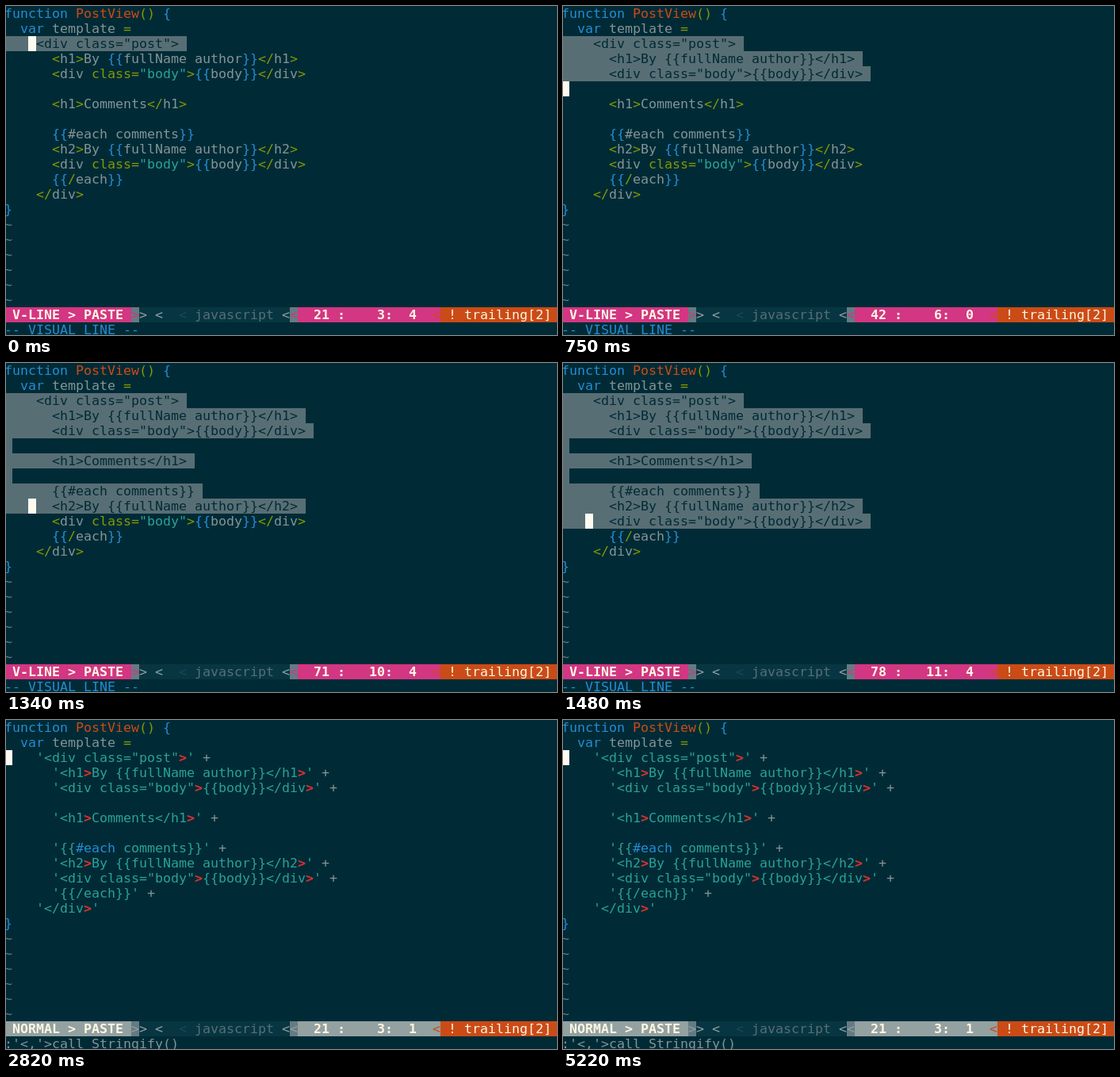
Write an HTML page that moves like this. It is 695 by 415 pixels and loops after 5610 ms.

```html
<!DOCTYPE html>
<html lang="en">
<head>
<meta charset="utf-8">
<title>Wrapping lines as strings</title>
<style>
  html, body { margin: 0; width: 100%; height: 100%; overflow: hidden; background: #002b36; }
  svg { display: block; width: 695px; height: 415px; }
  text { font: 16.61px "DejaVu Sans Mono", "Liberation Mono", monospace; white-space: pre; }
</style>
</head>
<body>
<svg id="screen" viewBox="0 0 695 415"></svg>
<script>
const C = {
  bg: '#002b36', bar: '#073642', faint: '#1b4a55', dim: '#586e75', mid: '#657b83',
  text: '#839496', pale: '#93a1a1', cream: '#fdf6e3', cursor: '#fefaf0',
  blue: '#268bd2', green: '#859900', cyan: '#2aa198', orange: '#cb4b16',
  red: '#dc322f', pink: '#d33682'
};
const LOOP = 5610, DONE = 2820, FIRST = 2, LAST = 12;
const STEPS = [450, 600, 750, 890, 1040, 1190, 1340, 1480, 1630, 1930];
const CELL = 10, ROW = 19, LEFT = -2, BASE = 15;

const LINES = [
  'function PostView() {',
  '  var template =',
  '    <div class="post">',
  '      <h1>By {{fullName author}}</h1>',
  '      <div class="body">{{body}}</div>',
  '',
  '      <h1>Comments</h1>',
  '',
  '      {{#each comments}}',
  '      <h2>By {{fullName author}}</h2>',
  '      <div class="body">{{body}}</div>',
  '      {{/each}}',
  '    </div>',
  '}'
];

const CODE_RULES = [
  [/^"[^"]*"/, C.cyan],
  [/^(function|var)\b/, C.blue],
  [/^PostView/, C.orange],
  [/^class=/, C.green],
  [/^[<>=\/()]+/, C.green],
  [/^[{}]+/, C.blue],
  [/^(\w+|.)/, C.text]
];
const STRING_RULES = [
  [/^ \+$/, C.text],
  [/^>/, C.red, true],
  [/^#each/, C.blue],
  [/^(\w+|[^\w>#])/, C.cyan]
];

const screen = document.getElementById('screen');
const escapeText = s => s.replace(/&/g, '&amp;').replace(/</g, '&lt;').replace(/>/g, '&gt;');

function write(row, col, str, color, bold) {
  if (!str.trim()) return '';
  return `<text x="${col * CELL + LEFT}" y="${row * ROW + BASE}" fill="${color}"` +
    `${bold ? ' font-weight="700" style="font-weight:700"' : ''}>${escapeText(str)}</text>`;
}

function fill(row, from, to, color) {
  const x = Math.max(0, from * CELL + LEFT);
  return `<rect x="${x}" y="${row * ROW}" width="${to * CELL + LEFT - x}" height="${ROW}" fill="${color}"/>`;
}

function highlight(row, line, rules) {
  let out = '', col = 0;
  while (col < line.length) {
    const rest = line.slice(col);
    const [pattern, color, bold] = rules.find(rule => rule[0].test(rest));
    const token = rest.match(pattern)[0];
    out += write(row, col, token, color, bold);
    col += token.length;
  }
  return out;
}

function quote(line, row) {
  if (!line) return '';
  return line.replace(/\S.*/, "'$&'") + (row < LAST ? ' +' : '');
}

function statusBar(mode, color, lineNo, colNo) {
  const r = 20;
  const percent = String(Math.floor(lineNo * 100 / LINES.length)).padStart(3);
  return fill(r, 0, 70, C.bar) +
    fill(r, 0, 16, color) + fill(r, 16, 17, C.mid) +
    fill(r, 36, 37, C.mid) + fill(r, 37, 55, color) + fill(r, 55, 70, C.orange) +
    write(r, 1, mode + ' > PASTE', C.cream, true) +
    write(r, 16, '>', color) + write(r, 17, '>', C.pale) + write(r, 19, '<', C.pale) +
    write(r, 22, '<', C.faint) + write(r, 24, 'javascript', C.dim) +
    write(r, 35, '<', C.pale) + write(r, 36, '<', color) +
    write(r, 38, `${percent} :${String(lineNo).padStart(5)}:${String(colNo).padStart(3)}`, C.cream, true) +
    write(r, 54, '<', C.orange) + write(r, 56, '! trailing[2]', C.cream);
}

function draw(cursorRow, done) {
  let out = '';
  LINES.forEach((line, row) => {
    const inBlock = row >= FIRST && row <= LAST;
    if (done && inBlock) {
      out += highlight(row, quote(line, row), STRING_RULES);
    } else if (inBlock && row <= cursorRow) {
      const isCursorRow = row === cursorRow;
      out += fill(row, 0, line.length + 1, C.dim) + write(row, 0, line, C.bg);
      if (isCursorRow) out += fill(row, line ? 3 : 0, line ? 4 : 1, C.cursor);
    } else {
      out += highlight(row, line, CODE_RULES);
    }
  });
  for (let row = LINES.length; row < 20; row++) out += write(row, 0, '~', C.mid);

  if (done) {
    out += fill(FIRST, 0, 1, C.cursor) +
      statusBar('NORMAL', C.pale, FIRST + 1, 1) +
      write(21, 0, ":'<,'>call Stringify()", C.text);
  } else {
    out += statusBar('V-LINE', C.pink, cursorRow + 1, LINES[cursorRow] ? 4 : 0) +
      write(21, 0, '-- VISUAL LINE --', C.blue);
  }
  screen.innerHTML = `<rect width="695" height="415" fill="${C.bg}"/>` + out;
}

let shown = '';
function update(ms) {
  const t = ms % LOOP;
  const done = t >= DONE;
  const row = FIRST + STEPS.filter(s => t >= s).length;
  const state = done ? 'done' : String(row);
  if (state === shown) return;
  shown = state;
  draw(row, done);
}

const start = performance.now();
function tick() {
  update(performance.now() - start);
  requestAnimationFrame(tick);
}
tick();
</script>
</body>
</html>
```
